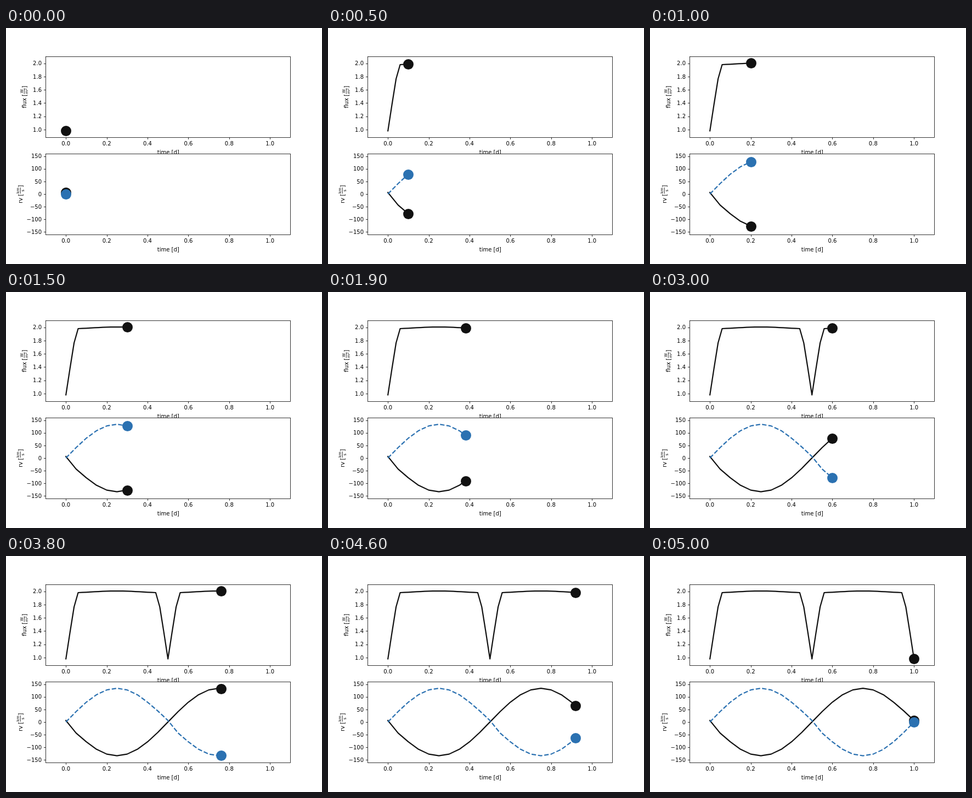
An HTML page with a canvas that plays this animation: 576 px wide and 432 px high, repeating every 5100 ms.

```html
<!DOCTYPE html>
<html lang="en">
<head>
<meta charset="utf-8">
<title>Flux and radial velocity</title>
<style>
  html, body { margin: 0; width: 100%; height: 100%; overflow: hidden; background: #fff; }
  canvas { display: block; }
</style>
</head>
<body>
<canvas id="stage" width="576" height="432"></canvas>
<script>
const ctx = document.getElementById('stage').getContext('2d');
const BLACK = '#111111', BLUE = '#2b71b1';
const STEP_MS = 100, STEPS = 51, DT = 0.02;
const LEFT = 72, RIGHT = 518.4, AMPLITUDE = 134;

const fluxAxes = { top: 51.84, bottom: 200.09, min: 0.883, max: 2.107 };
const rvAxes = { top: 229.75, bottom: 378, min: -1.2 * AMPLITUDE, max: 1.2 * AMPLITUDE };

const px = t => LEFT + (t + 0.1) * (RIGHT - LEFT) / 1.2;
const py = (axes, v) => axes.top + (axes.max - v) * (axes.bottom - axes.top) / (axes.max - axes.min);
const snap = v => Math.floor(v + 0.5) + 0.5;

// Eclipses every half orbit, gentle ellipsoidal variation in between.
function flux(t) {
  const k = Math.round(t / DT) % 25;
  const dip = [0.98, 1.38, 1.765][Math.min(k, 25 - k)];
  return dip ?? 1.992 - 0.014 * Math.cos(4 * Math.PI * t);
}

// Sine with a small distortion around the star's own eclipse.
function velocity(t, sign, eclipse) {
  const k = Math.round((t - eclipse) * 20);
  const phase = ((k % 20) + 20) % 20;
  const bump = { 0: 6, 1: -2.6, 19: 2.6 }[phase] ?? 0;
  return sign * AMPLITUDE * Math.sin(2 * Math.PI * t) + bump;
}

function makeSeries(axes, color, spacing, value, dash = []) {
  const count = Math.round(1 / spacing);
  const points = Array.from({ length: count + 1 }, (_, i) => [i * spacing, value(i * spacing)]);
  return { axes, color, points, dash };
}

const series = [
  makeSeries(fluxAxes, BLACK, DT, flux),
  makeSeries(rvAxes, BLACK, 0.05, t => velocity(t, -1, 0)),
  makeSeries(rvAxes, BLUE, 0.05, t => velocity(t, 1, 0.5), [8.14, 3.52])
];

function valueAt(points, t) {
  const i = points.findIndex(p => p[0] >= t - 1e-9);
  if (i <= 0) return points[0][1];
  const [t0, v0] = points[i - 1], [t1, v1] = points[i];
  return v0 + (v1 - v0) * (t - t0) / (t1 - t0);
}

function text(str, x, y, align = 'left', size = 10) {
  ctx.font = `${size}px "DejaVu Sans", sans-serif`;
  const width = ctx.measureText(str).width;
  const shift = { left: 0, center: width / 2, right: width }[align];
  ctx.fillText(str, x - shift, y);
  return width;
}

function line(x0, y0, x1, y1) {
  ctx.beginPath();
  ctx.moveTo(x0, y0);
  ctx.lineTo(x1, y1);
  ctx.stroke();
}

function drawFrame(axes, ticks, format) {
  const l = snap(LEFT), r = snap(RIGHT), t = snap(axes.top), b = snap(axes.bottom);
  ctx.fillStyle = '#fff';
  ctx.fillRect(l, t, r - l, b - t);
  ctx.strokeStyle = ctx.fillStyle = '#000';
  ctx.lineWidth = 0.8;
  for (let i = 0; i <= 5; i++) {
    const x = px(i / 5);
    line(snap(x), b, snap(x), b + 3.5);
    text((i / 5).toFixed(1), x, Math.round(axes.bottom + 14.7), 'center');
  }
  for (const v of ticks) {
    const y = py(axes, v);
    line(l, snap(y), l - 3.5, snap(y));
    text(format(v), 65, Math.round(y + 3.7), 'right');
  }
  ctx.strokeRect(l, t, r - l, b - t);
  text('time [d]', (LEFT + RIGHT) / 2 + 0.5, Math.round(axes.bottom + 30.7), 'center');
}

// Rotated label ending in a bracketed fraction.
function drawUnitLabel(x, y, name, over, under, exponent, width) {
  ctx.save();
  ctx.translate(x, y);
  ctx.rotate(-Math.PI / 2);
  ctx.fillStyle = '#000';
  let pen = -width / 2;
  pen += text(name + ' [', pen, 0);
  ctx.font = '7px "DejaVu Sans", sans-serif';
  const underWidth = ctx.measureText(under).width;
  const lowWidth = underWidth + (exponent ? 3.3 : 0);
  const barWidth = Math.max(ctx.measureText(over).width, lowWidth) + 0.4;
  const middle = pen + barWidth / 2 + 0.4;
  text(over, middle, -5.9, 'center', 7);
  text(under, middle - lowWidth / 2, 3.4, 'left', 7);
  if (exponent) text(exponent, middle - lowWidth / 2 + underWidth, 0.9, 'left', 4.9);
  ctx.fillRect(pen + 0.4, -4.2, barWidth, 0.8);
  text(']', pen + barWidth + 0.8, 0);
  ctx.restore();
}

function drawLine({ axes, color, points, dash }, now) {
  ctx.strokeStyle = color;
  ctx.lineWidth = 2.2;
  ctx.lineJoin = 'round';
  ctx.lineCap = dash.length ? 'butt' : 'square';
  ctx.setLineDash(dash);
  ctx.beginPath();
  for (const [t, v] of points) if (t < now - 1e-9) ctx.lineTo(px(t), py(axes, v));
  ctx.lineTo(px(now), py(axes, valueAt(points, now)));
  if (now > 0) ctx.stroke();
  ctx.setLineDash([]);
  ctx.lineCap = 'butt';
  ctx.lineJoin = 'miter';
}

function drawDot({ axes, color, points }, now) {
  ctx.fillStyle = color;
  ctx.beginPath();
  ctx.arc(snap(px(now)), snap(py(axes, valueAt(points, now))), 9.5, 0, 2 * Math.PI);
  ctx.fill();
}

function draw(ms) {
  const now = Math.floor(ms / STEP_MS) % STEPS * DT;
  ctx.fillStyle = '#fff';
  ctx.fillRect(0, 0, 576, 432);
  drawFrame(fluxAxes, [1, 1.2, 1.4, 1.6, 1.8, 2], v => v.toFixed(1));
  drawFrame(rvAxes, [-150, -100, -50, 0, 50, 100, 150], v => String(v).replace('-', '\u2212'));
  drawUnitLabel(37, 126, 'flux', 'W', 'm', '2', 41.5);
  drawUnitLabel(30, 304, 'rv', 'km', 's', '', 33.5);
  series.forEach(s => drawLine(s, now));
  series.forEach(s => drawDot(s, now));
}

let start;
function tick(time) {
  start ??= time;
  draw(time - start);
  requestAnimationFrame(tick);
}
draw(0);
requestAnimationFrame(tick);
</script>
</body>
</html>
```
